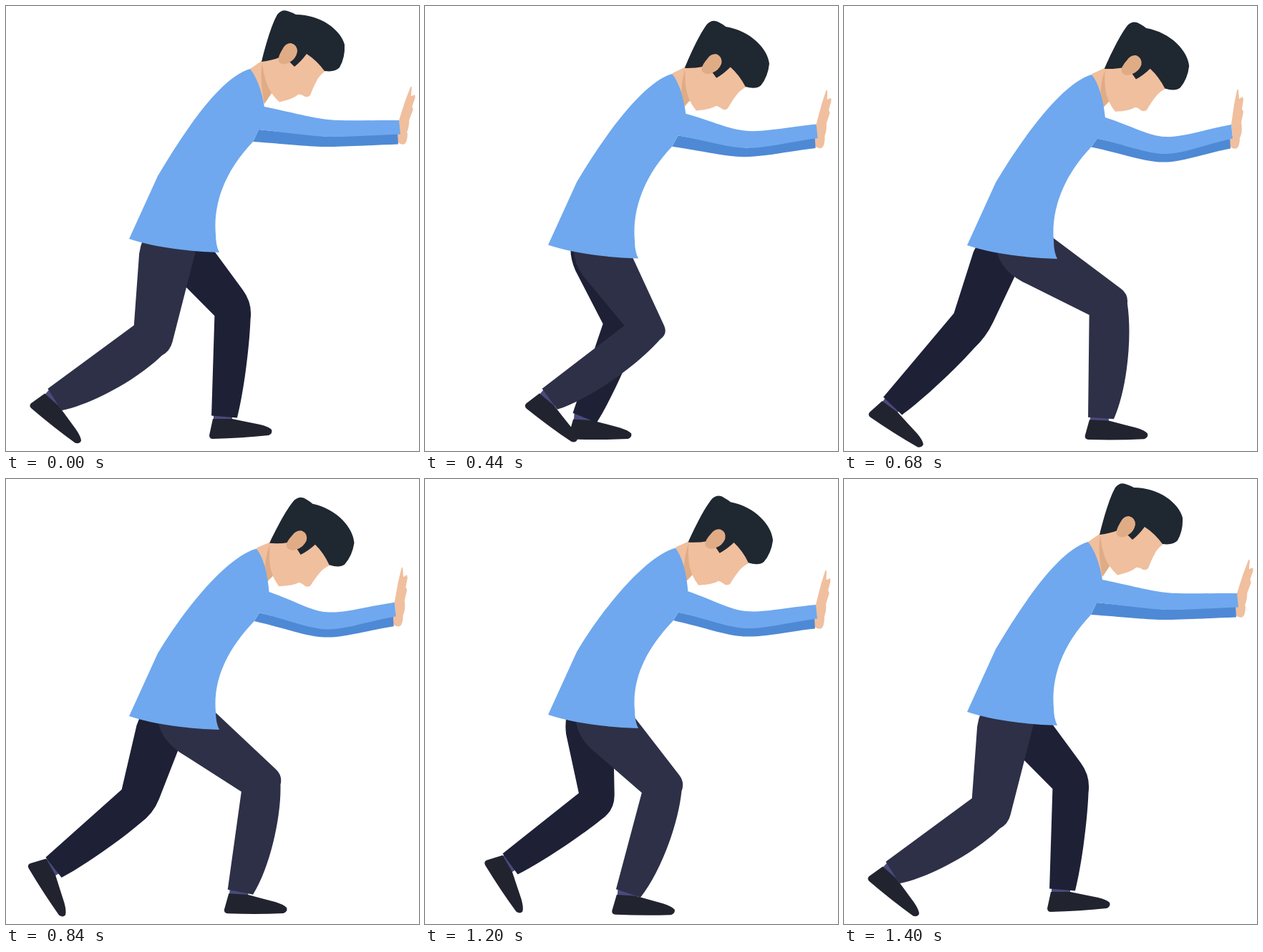
Recreate the animation shown at these times as an HTML page. Size 577 px wide and 623 px high, loop 1440 ms.

```html
<!DOCTYPE html>
<html lang="en">
<head>
<meta charset="utf-8">
<title>Pushing man</title>
<style>
  html, body { margin: 0; width: 100%; height: 100%; overflow: hidden; background: #fff; }
  svg { display: block; width: 100%; height: 100%; }
  .shirt { fill: #6fa8ee; }
  .sleeve { fill: #4e89d5; }
  .skin { fill: #f0bf9e; }
  .shade { fill: #e0ac86; }
  .hair { fill: #1f2731; }
  .near { fill: #2e3047; }
  .far { fill: #1e2036; }
  .shoe { fill: #21242f; }
  .sock { fill: #4a4a7e; }
</style>
</head>
<body>
<svg viewBox="0 0 577 623">
  <defs>
    <!-- origin at the ankle -->
    <g id="foot">
      <path class="sock" d="M-15-6H11V4H-15Z"/>
      <path class="shoe" d="M-16 3L-21 26Q-21 31-16 31Q25 30 62 26Q68 23 66 18Q62 14 50 11Q30 7 11 3Z"/>
    </g>
  </defs>
  <path id="farHand" class="skin" d="M-2-18L-1-3Q3 1 8 0Q13-2 13-16Z"/>
  <path id="farArm" class="sleeve"/>
  <!-- origin at the ear -->
  <g id="head">
    <g transform="translate(-395 -67)">
      <path class="skin" d="M341 88L357 77L400 55L425 66L446 91Q437 98 434 105Q430 112 425 125Q422 128 418 127Q411 123 408 124Q402 130 382 134.5Q375 128 371 122L361 137L348 112Z"/>
      <path class="shade" d="M358 80C355 95 357 115 361 137L371 122C363 110 360 95 358 80Z"/>
      <path class="hair" d="M357 78C362 58 370 28 379 12Q386 3 396 8Q402 10 405 12C440 12 468 34 473 54Q474 72 466 86Q460 93 445 91Q434 76 420 67Q412 78 403 85L396 78L382 72Q372 76 357 78Z"/>
      <path class="shade" d="M382 79Q378 74 386 61Q390 52 398 52Q407 54 407 64Q405 74 396 79Q388 84 382 79Z"/>
    </g>
  </g>
  <use id="farFoot" href="#foot"/>
  <path id="farLeg" class="far"/>
  <use id="nearFoot" href="#foot"/>
  <path id="nearLeg" class="near"/>
  <path id="torso" class="shirt"/>
  <path id="nearHand" class="skin" d="M0 0L4-28L8-48Q9-51 10-48L11-36L16-39L17-35L15-22L17-18L14-3Q16 8 13 17Q9 21 2 18Z"/>
  <path id="nearArm" class="shirt"/>
</svg>
<script>
const LOOP = 1440;
const BEATS = [0, 280, 520, 680, 1000, 1200, 1400];
const STRIDE = BEATS.slice(1);

// Key poses; the first one also closes the cycle
// body: dip, nod, elbow bend, wrist x, wrist y
const body = [
  [0, 0, 0, 549, 160],
  [6, .58, .33, 551, 170],
  [9, .7, .65, 544, 164],
  [9, .75, .83, 541, 166],
  [3, 1, 1, 545, 178],
  [4, .8, .9, 546, 176]
];
// legs: knee x, knee y, ankle x, ankle y, foot tilt
const near = {
  name: 'near', hip: 231, thigh: 40, knee: 31, round: 13, calf: 13,
  keys: [
    [204, 465, 68, 551, 42],
    [354, 431, 246, 550, 38],
    [370, 409, 359, 577, 3],
    [341, 432, 291, 579, 4],
    [333, 428, 284, 580, 4]
  ]
};
const far = {
  name: 'far', hip: 227, thigh: 35, knee: 28, round: 23, calf: 4,
  keys: [
    [318, 425, 305, 575, 0],
    [245, 441, 166, 577, 7],
    [176, 438, 68, 560, 36],
    [200, 454, 66, 535, 74],
    [240, 448, 119, 539, 60]
  ]
};

const el = id => document.getElementById(id);
const blend = (p, q, k) => p.map((v, i) => v + (q[i] - v) * k);
const shift = (p, x, y) => [p[0] + x, p[1] + y];
const move = (p, dir, d) => shift(p, dir[0] * d, dir[1] * d);
const unit = (p, q) => {
  const x = q[0] - p[0], y = q[1] - p[1], len = Math.hypot(x, y);
  return [x / len, y / len];
};
const normal = ([x, y]) => [y, -x];
const path = (...parts) => parts.map(p => typeof p === 'string' ? p : p.map(v => v.toFixed(2)).join(' ')).join(' ');
const shape = (id, ...parts) => el(id).setAttribute('d', path(...parts, 'Z'));
const place = (id, [x, y], tilt = 0) =>
  el(id).setAttribute('transform', `translate(${x} ${y}) rotate(${tilt})`);

// Monotone cubic through the keys, at rest at both ends
function pose(keys, times, t) {
  const last = times.length - 1;
  const key = i => keys[i % keys.length];
  t = Math.max(times[0], Math.min(t, times[last]));
  let i = 0;
  while (i < last - 1 && t >= times[i + 1]) i++;
  const span = times[i + 1] - times[i];
  const u = (t - times[i]) / span;
  return key(i).map((a, c) => {
    const rate = j => (key(j + 1)[c] - key(j)[c]) / (times[j + 1] - times[j]);
    const slope = j => {
      if (j === 0 || j === last) return 0;
      const p = rate(j - 1), q = rate(j);
      return p * q > 0 ? 2 * p * q / (p + q) : 0;
    };
    return a + (key(i + 1)[c] - a) * u * u * (3 - 2 * u)
      + span * u * (1 - u) * (slope(i) * (1 - u) - slope(i + 1) * u);
  });
}

// Soft bend from a through b to c
function bend(a, b, c) {
  const dx = (c[0] - a[0]) * .13, dy = (c[1] - a[1]) * .13;
  return path('C', blend(a, b, .45), shift(b, -dx, -dy), b, shift(b, dx, dy), blend(c, b, .4), c);
}

// Trouser leg grown around the bones hip, knee, ankle
function drawLeg(leg, dip, t) {
  const [kx, ky, ax, ay, tilt] = pose(leg.keys, STRIDE, t);
  const pivot = [236, 331 + dip], knee = [kx, ky + dip], ankle = [ax, ay];
  const thigh = unit(pivot, knee), shin = unit(knee, ankle);
  const lap = normal(thigh), front = normal(shin);
  const fold = unit([0, 0], shift(lap, ...front));

  const hip = [leg.hip + 18 * thigh[0], pivot[1]];
  const groin = move(hip, lap, leg.thigh), seat = move(hip, lap, -leg.thigh);
  const cap = move(knee, fold, leg.knee), pit = move(knee, fold, -leg.knee);
  const instep = move(ankle, front, 18), heel = move(ankle, front, -18);
  const above = move(cap, unit(cap, groin), leg.round);
  const below = move(cap, unit(cap, instep), leg.round);

  shape(leg.name + 'Leg', 'M', groin, 'L', above, 'Q', cap, below,
    'C', move(blend(below, instep, .3), front, leg.calf), move(blend(below, instep, .75), front, leg.calf), instep,
    'L', heel, 'L', pit, 'L', blend(seat, pit, .2),
    'Q', move(seat, thigh, -22), move(hip, thigh, -40));
  place(leg.name + 'Foot', ankle, tilt);
}

function draw(t) {
  const [dip, nod, flex, wx, wy] = pose(body, BEATS, t);
  drawLeg(far, dip, t);
  drawLeg(near, dip, t);
  place('head', [395 + 18 * nod - .6 * dip, 67 + 22 * nod], 13 * nod);

  const nape = [341 + 14 * nod - .6 * dip, 88 + 10.5 * nod];
  const back = [212, 238 + dip];
  const hemL = [172, 326 + dip], hemR = [298, 345 + dip];
  const pit = [345 + 4 * nod - .3 * dip, 190 + 10 * nod];

  const shoulder = [361 + 10 * nod - .4 * dip, 141 + 18 * flex];
  const inner = [353 + flex, 173 + 15 * flex];
  const elbow = [450 - 2 * flex, 159 + 29 * flex];
  const under = shift(elbow, 0, 24);
  const farElbow = [445, 197 + 26 * flex];
  const wrist = [wx, wy], cuff = shift(wrist, 2, 19.5), farWrist = shift(wrist, -1, 33.5);

  shape('torso', 'M', nape, 'C', shift(nape, -42, 12), shift(back, 37, -62), back,
    'L', hemL, 'Q', shift(hemL, 50, 16.5), hemR, 'Q', shift(hemR, -5, -10), shift(hemR, -5, -25),
    'C', shift(hemR, -9, -70), shift(pit, -38, 40), pit, 'L', inner, 'L', shoulder,
    'Q', shift(nape, 14, 18), nape);
  shape('nearArm', 'M', shoulder, bend(shoulder, elbow, wrist), 'L', cuff,
    bend(cuff, under, inner), 'L', shift(inner, -20, -10));
  shape('farArm', 'M', pit, bend(pit, farElbow, farWrist),
    'L', shift(farWrist, -1, -16), 'L', under, 'L', inner);
  place('nearHand', wrist, 1.2 * (wx - 541));
  place('farHand', farWrist);
}

// The picture holds for 80 ms early in the stride and for 40 ms later
const snap = (t, step) => t - t % step;
const held = t => t < 280 ? snap(t, 80) : t < 440 ? 280 + snap(t - 280, 80) : snap(t, 40);

const start = performance.now();
function tick() {
  draw(held((performance.now() - start) % LOOP));
  requestAnimationFrame(tick);
}
tick();
</script>
</body>
</html>
```
